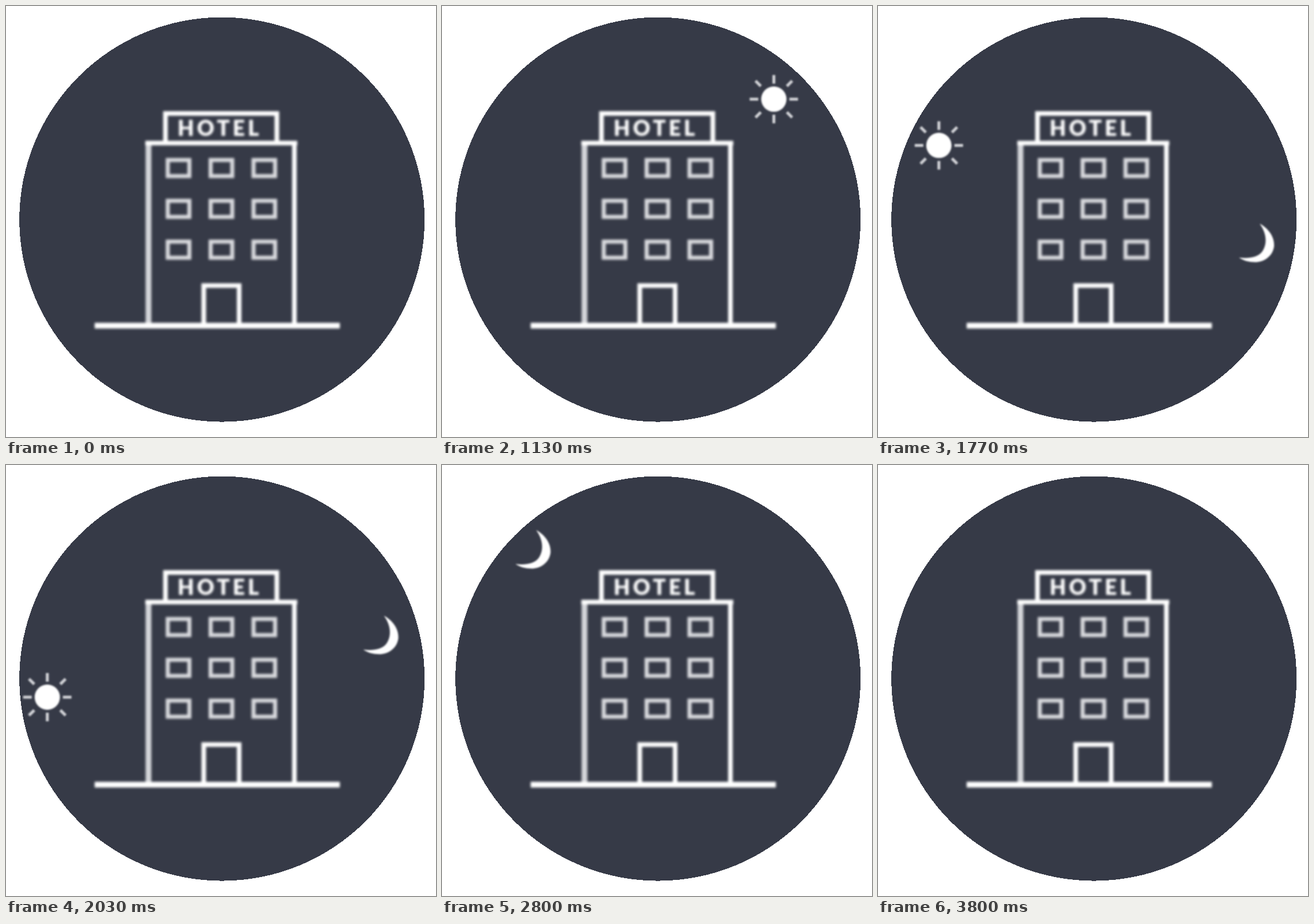
An HTML page for the animation above (4030 ms loop, 747 by 750 pixels).

```html
<!DOCTYPE html>
<html lang="en">
<head>
<meta charset="utf-8">
<title>Hotel day and night</title>
<style>
  html, body { margin: 0; width: 100%; height: 100%; overflow: hidden; background: #fff; }
  svg { display: block; width: 100vw; height: 100vh; }
  .soft { filter: blur(2.1px); }
  .sky { filter: blur(1.6px); }
  .line { fill: none; stroke: #fff; stroke-width: 8; }
  #windows { stroke: #d9dade; stroke-width: 7; }
  text { font: 900 37px Lato, "Open Sans", sans-serif; letter-spacing: 5px; fill: #fff; }
</style>
</head>
<body>
<svg viewBox="0 0 747 750">
  <circle cx="375.2" cy="371.6" r="352" fill="#363a47" shape-rendering="crispEdges"/>
  <g class="soft">
    <g class="line">
      <path d="M277 238V187H470.5V238"/>
      <path d="M247.5 556V235" stroke="#d6d7db" style="stroke-width:10"/>
      <path d="M501 556V235"/>
      <path d="M242 238.5H506"/>
      <path d="M343.5 556V486.5H405V556"/>
      <path d="M154 556.3H580" style="stroke-width:10"/>
    </g>
    <g id="windows" class="line"></g>
    <text x="298" y="225.5">HOTEL</text>
  </g>
  <g id="sun"><g class="sky" transform="translate(0 11)">
    <circle r="22" fill="#fff"/>
    <g id="rays" stroke="#d3d4d8" stroke-width="5"></g>
  </g></g>
  <g id="moon">
    <path class="sky" fill="#fff" transform="translate(-12 -2)"
      d="M5-33C20-25 31-10 30 6C28 24 12 34-3 34C-14 34-24 31-31 26C-14 28 1 26 9 16C18 4 18-15 5-33Z"/>
  </g>
</svg>
<script>
const LOOP = 4030, FPS = 30, CX = 372, CY = 372, R = 301;
const SUN_START = 4, MOON_START = 39;  // steps
const byId = id => document.getElementById(id);

function add(parent, tag, attrs) {
  const el = document.createElementNS("http://www.w3.org/2000/svg", tag);
  for (const k in attrs) el.setAttribute(k, attrs[k]);
  byId(parent).appendChild(el);
}

for (let row = 0; row < 3; row++)
  for (let col = 0; col < 3; col++)
    add("windows", "rect", { x: 281 + col * 74.5, y: 268 + row * 71, width: 37.5, height: 28 });

for (let i = 0; i < 8; i++) {
  const odd = i % 2;
  add("rays", "line", {
    x1: odd ? 32 : 27, x2: odd ? 45 : 42, y1: 0, y2: 0,
    transform: `rotate(${i * 45})`
  });
}

// [step, degrees counter-clockwise from the right], shared by sun and moon
const arc = [[0, -36], [19, 4.8], [40, 98], [45, 132], [57, 184], [69, 212], [75, 216]];

const slope = i => (arc[i + 1][1] - arc[i][1]) / (arc[i + 1][0] - arc[i][0]);

function tangent(i) {
  if (i === 0) return slope(0);
  if (i === arc.length - 1) return slope(i - 1);
  const a = slope(i - 1), b = slope(i);
  return 2 * a * b / (a + b);
}

// Smooth curve through the keys
function angle(n) {
  let i = 0;
  while (i < arc.length - 2 && n >= arc[i + 1][0]) i++;
  const [n0, a0] = arc[i], [n1, a1] = arc[i + 1];
  const h = n1 - n0, u = (n - n0) / h, v = 1 - u;
  return v * v * (1 + 2 * u) * a0 + u * u * (3 - 2 * u) * a1
    + h * u * v * (v * tangent(i) - u * tangent(i + 1));
}

function inOut(u) {
  u = Math.min(1, Math.max(0, u));
  return u < .5 ? 4 * u ** 3 : 1 - 4 * (1 - u) ** 3;
}

// Grows while rising, shrinks while setting
const size = n => inOut(n / 9) - inOut((n - 60.5) / 13);

function place(id, n) {
  const el = byId(id), scale = size(n);
  el.style.display = scale > .005 ? "" : "none";
  const a = angle(n) * Math.PI / 180;
  el.setAttribute("transform",
    `translate(${CX + R * Math.cos(a)} ${CY - R * Math.sin(a)}) scale(${scale})`);
}

function draw(ms) {
  // steps fall on 10 ms ticks
  const step = Math.floor((Math.floor(ms / 10) + .5) * FPS / 100);
  place("sun", step - SUN_START);
  place("moon", step - MOON_START);
}

const start = performance.now();
function tick() {
  draw((performance.now() - start) % LOOP);
  requestAnimationFrame(tick);
}
tick();
</script>
</body>
</html>
```
